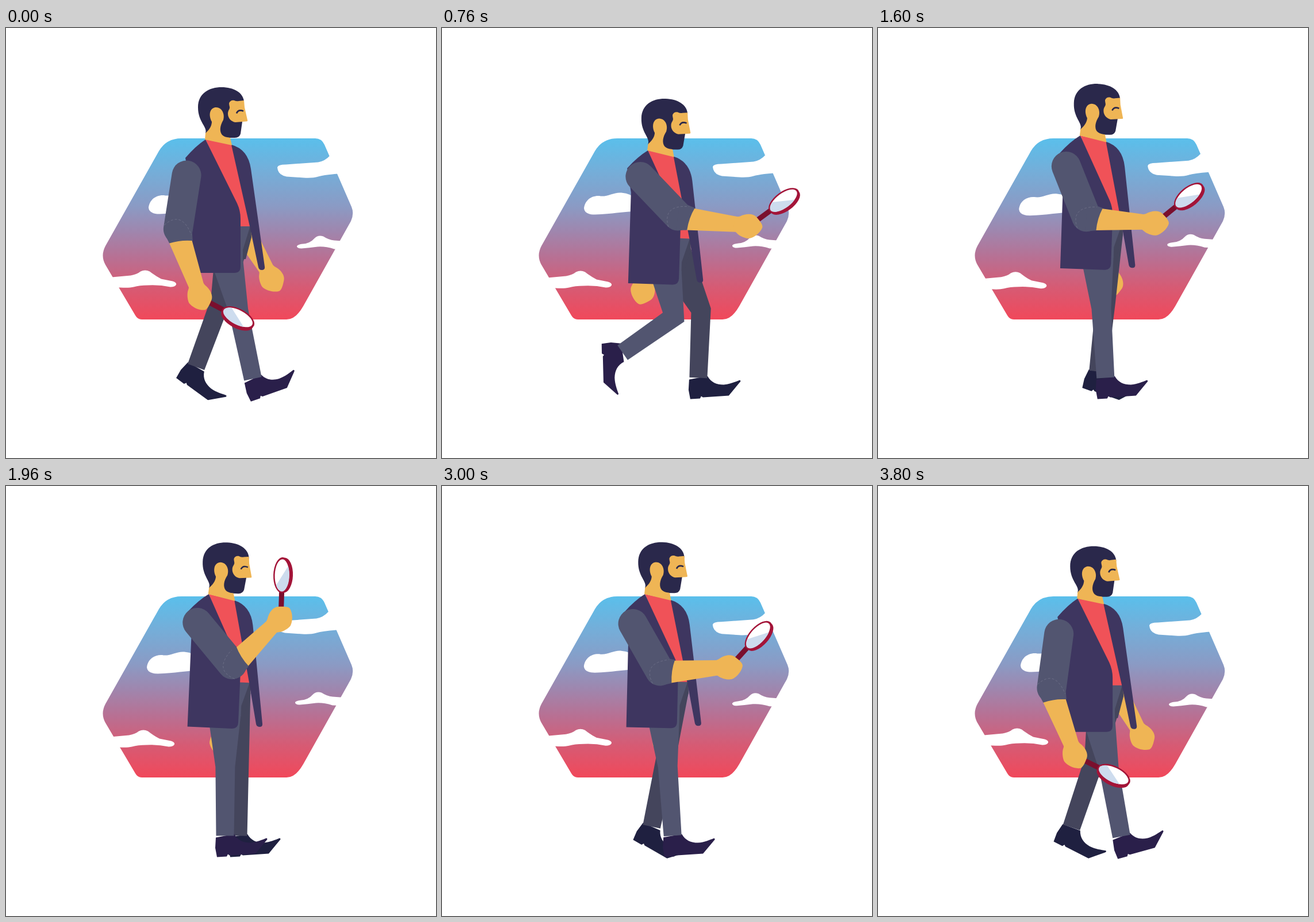
An HTML page for the animation above (3.84 s loop, 748 by 748 pixels).

```html
<!DOCTYPE html>
<html lang="en">
<head>
<meta charset="utf-8">
<title>Walking with a magnifier</title>
<style>
html, body { margin: 0; width: 100%; height: 100%; overflow: hidden; background: #fff; }
svg { display: block; width: 100vw; height: 100vh; }
</style>
</head>
<body>
<svg viewBox="0 0 748 748">
  <defs>
    <linearGradient id="sky" gradientUnits="userSpaceOnUse" x1="0" y1="192" x2="0" y2="507">
      <stop offset="0" stop-color="#5abfeb"/>
      <stop offset=".18" stop-color="#74aed9"/>
      <stop offset=".37" stop-color="#8a9bc5"/>
      <stop offset=".5" stop-color="#9d88b0"/>
      <stop offset=".66" stop-color="#b87093"/>
      <stop offset=".82" stop-color="#d65b74"/>
      <stop offset="1" stop-color="#f1485a"/>
    </linearGradient>
    <path id="boot" d="M-16 3L16-3C22 8 32 12 44 12C56 11 64 7 72 4Q75 5 72 8Q62 20 53 31L8 34L5 32L3 36L-14 37L-17 21Z"/>
    <g id="hand" fill="#efb555">
      <path d="M19-18L27-17L104-13.5L104 13L18 22Z"/>
      <path transform="translate(125)" d="M-26-12L-18-15C-8-22 4-23 10-18C16-13 24-6 23-1C21 8 12 18 3 21C-4 22-14 19-18 16C-22 13-24 12-27 11Z"/>
    </g>
  </defs>

  <path fill="url(#sky)" d="M305 192H538Q549 192 554 203L601 311Q606 323 600 336L517 484Q504 507 488 507H236Q229 507 225 500L173 412Q164 396 173 379L266 214Q279 192 305 192Z"/>
  <g fill="#fff">
    <path class="cloud" d="M469 241Q470 236 484 236L540 232Q552 230 561 220L570 209L595 252L575 252Q550 254 540 257Q530 260 515 259L485 257Q470 254 469 241Z"/>
    <path class="cloud" d="M245 314C247 296 264 291 274 293C287 294 297 286 310 287Q327 288 338 300V319Q321 320 302 322Q287 324 264 325Q246 325 245 314Z"/>
    <path class="cloud" d="M503 378Q504 375 514 374Q526 373 534 364Q540 358 549 361Q558 367 568 368L595 370V384L568 383Q552 378 539 379Q524 381 511 382Q503 382 503 378Z"/>
    <path class="cloud" d="M170 436L214 432Q225 430 231 425Q239 421 247 425Q257 433 267 438L287 442Q294 444 293 448Q291 452 283 452Q264 448 244 449Q229 449 219 452Q211 454 196 453H175Z"/>
  </g>

  <use id="farArm" href="#hand"/>
  <use id="farBoot" href="#boot" fill="#1f2040"/>
  <polygon id="farLeg" fill="#44455c"/>
  <use id="nearBoot" href="#boot" fill="#2a1f4a"/>
  <polygon id="nearLeg" fill="#525570"/>

  <g id="body">
    <path fill="#44455c" d="M400 345H426L427 364L417 402H400Z"/>
    <path fill="#525570" d="M370 335L425 344L412 386V404L354 406Z"/>
    <path fill="#f05258" d="M347 194L393 203L425 345H407L396 300Z"/>
    <g fill="#3e3660">
      <path d="M392 203Q421 211 426 245L450 415Q451 421 445 421Q440 421 439 416L424 345Z"/>
      <path d="M347 194Q330 205 312 226L320 268V426H397Q408 426 408 415V332Q408 318 402 305Z"/>
    </g>
    <path fill="#2a284b" d="M347 183C351 172 334 164 334 138C334 113 354 103 375 103C396 103 412 112 414 127L411 163L408 184Q406 191 398 191H384L347 184Z"/>
    <path fill="#efb555" d="M347 183C356 175 358 168 358 163C352 152 354 139 365 138C376 138 381 150 378 160C372 170 371 180 376 186Q380 190 388 190.500L390 191L393 204L346 194Z"/>
    <path fill="#efb555" d="M388 131C389 127 393 125 397 126Q401 128 405 127L414 126L415 138L420 160Q421 162.500 418 162.500L399 164C392 163 386 157 386 149C386 143 390 141 389 137Q388 133 388 131Z"/>
    <path fill="none" stroke="#2a284b" stroke-width="2.600" d="M401 148.500Q404 141 413 144.500"/>
  </g>

  <line id="sleeve" stroke="#525570" stroke-width="51" stroke-linecap="round"/>
  <g id="fore">
    <g id="grip">
      <path fill="#7a0f2e" d="M10-4.500H48V4.500H10Z"/>
      <g fill="#a31438">
        <ellipse cx="75" rx="31" ry="15.500"/>
        <ellipse cx="75" cy="3.500" rx="30.500" ry="15"/>
      </g>
      <ellipse cx="75" cy="-.5" rx="27.500" ry="12.500" fill="#fff"/>
      <path fill="#cddcee" d="M57-10A27.500 12.500 0 0 0 91 9.700Z"/>
    </g>
    <use id="palm" href="#hand"/>
    <path fill="#525570" d="M0-25L27-18Q19 1 19 22L0 25Z"/>
    <path fill="none" stroke="#70728a" stroke-width=".8" stroke-dasharray="4 3" d="M-14 21Q-30-16 17-19"/>
  </g>
</svg>
<script>
const LOOP = 3840, STRIDE = 1280, FRAME = 40;
const HIP = [385, 400], GROUND = 608.5;
const RAD = Math.PI / 180, TURN = 2 * Math.PI;
const $ = id => document.getElementById(id);
const clouds = document.querySelectorAll('.cloud');

const mix = (a, b, u) => a + (b - a) * u;
const ramp = (t, a, b) => {
  const u = Math.min(1, Math.max(0, (t - a) / (b - a)));
  return u * u * (3 - 2 * u);
};
const hold = (t, a, b, c, d) => ramp(t, a, b) - ramp(t, c, d);
const polar = ([x, y], angle, r) =>
  [x + r * Math.cos(angle * RAD), y + r * Math.sin(angle * RAD)];
const unit = (a, b) => {
  const x = b[0] - a[0], y = b[1] - a[1], l = Math.hypot(x, y);
  return [x / l, y / l];
};
const place = (id, [x, y], angle) =>
  $(id).setAttribute('transform', `translate(${x} ${y}) rotate(${angle})`);

// Ankle and foot angle in the stride; heel contact is at phase 0.
function step(phase, standX, still) {
  const lift = Math.cos((phase - 235 * RAD) / 2) ** 2;
  const kick = lift ** 3.6 * (1 - still);
  const toeUp = Math.cos(phase / 2) ** 120 * (1 - still);
  const x = 380 + 66 * Math.cos(phase - 41.5 * RAD);
  return {
    ankle: [mix(x, standX, still), GROUND - 45 * kick + 2 * toeUp],
    foot: 95 * kick - 16 * toeUp
  };
}

// Two-bone knee that bends forward and stretches when out of reach.
function findKnee(hip, ankle, thigh, shin) {
  const d = Math.hypot(ankle[0] - hip[0], ankle[1] - hip[1]);
  const k = Math.max(1, d / (thigh + shin));
  const a = thigh * k, b = shin * k;
  const along = (a * a - b * b + d * d) / (2 * d);
  const out = Math.sqrt(Math.max(0, a * a - along * along));
  const [x, y] = unit(hip, ankle);
  return [hip[0] + x * along + y * out, hip[1] + y * along - x * out];
}

// Leg outline with a mitred knee.
function drawLeg(name, back, front, knee, { ankle, foot }) {
  const top = [mix(back[0], front[0], .5), mix(back[1], front[1], .5)];
  const thigh = unit(top, knee), shin = unit(knee, ankle);
  const bend = [thigh[0] + shin[0], thigh[1] + shin[1]];
  const w = 34 / (bend[0] ** 2 + bend[1] ** 2);
  const side = ([x, y], [dx, dy], s) => [x + dy * s, y - dx * s];
  $(name + 'Leg').setAttribute('points', [
    back, front, side(knee, bend, w), side(ankle, shin, 15.5),
    side(ankle, shin, -15.5), side(knee, bend, -w)
  ].join(' '));
  place(name + 'Boot', ankle, foot);
}

function draw(t) {
  // Weights of the pause, the raised lens and the curious lean.
  const still = hold(t, 1280, 1760, 2780, 3100);
  const raised = hold(t, 1280, 1900, 2700, 3300);
  const lean = hold(t, 2000, 2350, 2640, 2900);

  // The stride slows a little at each heel contact of the near leg.
  const turn = TURN * t / STRIDE;
  const phase = turn - .35 * Math.sin(turn);
  const swing = (.966 - Math.cos(phase - 15 * RAD)) / 1.832;

  const bob = 6.1 + 15 * Math.cos(phase - 246 * RAD);
  const pelvis = [
    HIP[0] + mix(4.6 * swing, -3.3, still),
    HIP[1] + mix(bob, -4.6, still)
  ];
  const hip = [pelvis[0] - 10.4 * lean, pelvis[1] - 2 * lean];
  const tilt = mix(1.8 * swing, 2.5, still) + 9.5 * lean;
  const cos = Math.cos(tilt * RAD), sin = Math.sin(tilt * RAD);
  const onBody = (x, y) => {
    x -= HIP[0];
    y -= HIP[1];
    return [hip[0] + x * cos - y * sin, hip[1] + x * sin + y * cos];
  };
  $('body').setAttribute('transform',
    `translate(${hip}) rotate(${tilt}) translate(${-HIP[0]} ${-HIP[1]})`);

  const near = step(phase, 381, still);
  drawLeg('near', onBody(354, 400), onBody(412, 400),
    findKnee(pelvis, near.ankle, 84, 108), near);
  const far = step(phase + Math.PI, 404, still);
  const farHip = [pelvis[0] + 25, pelvis[1] - 25];
  drawLeg('far', onBody(364, 385), onBody(427, 362),
    findKnee(farHip, far.ankle, 103, 117), far);

  const back = mix(swing, .77, raised) + .17 * lean;
  const farAngle = 61 + 49 * back;
  const farHand = [463 - 114 * back, 438 + 20 * back - 6 * raised - 10 * lean];
  place('farArm', polar(farHand, farAngle, -125), farAngle);

  // The arm winds up just before it raises the lens.
  const windUp = 8 * Math.exp(-(((t - 1300) / 150) ** 2));
  const upper = mix(98.9 - 52.6 * swing, 50.4, raised) + 10.6 * lean + windUp;
  const lower = mix(72.3 - 64.1 * swing, -43.6, raised) + 7.2 * lean + windUp;
  const reach = 125 - 8 * raised;
  const lift = Math.max(0, (99 - upper + tilt) / 54 - .22 * raised);
  const shoulder = onBody(314 + 21 * lift, 256 - 16 * lift);
  const elbow = polar(shoulder, upper, 95);
  const ends = { x1: shoulder[0], y1: shoulder[1], x2: elbow[0], y2: elbow[1] };
  for (const k in ends) $('sleeve').setAttribute(k, ends[k]);
  place('fore', elbow, lower);
  place('grip', [reach, 0], -44.5);
  place('palm', [reach - 125, 0], 0);

  const drift = TURN * t / LOOP;
  clouds.forEach((c, i) => {
    const dx = 1.5 + 1.5 * Math.cos(drift), dy = 1.5 * Math.cos(drift + i * Math.PI);
    c.setAttribute('transform', `translate(${dx} ${dy})`);
  });
}

const start = performance.now();
function tick() {
  const t = (performance.now() - start) % LOOP;
  draw(Math.floor(t / FRAME) * FRAME);
  requestAnimationFrame(tick);
}
draw(0);
requestAnimationFrame(tick);
</script>
</body>
</html>
```
